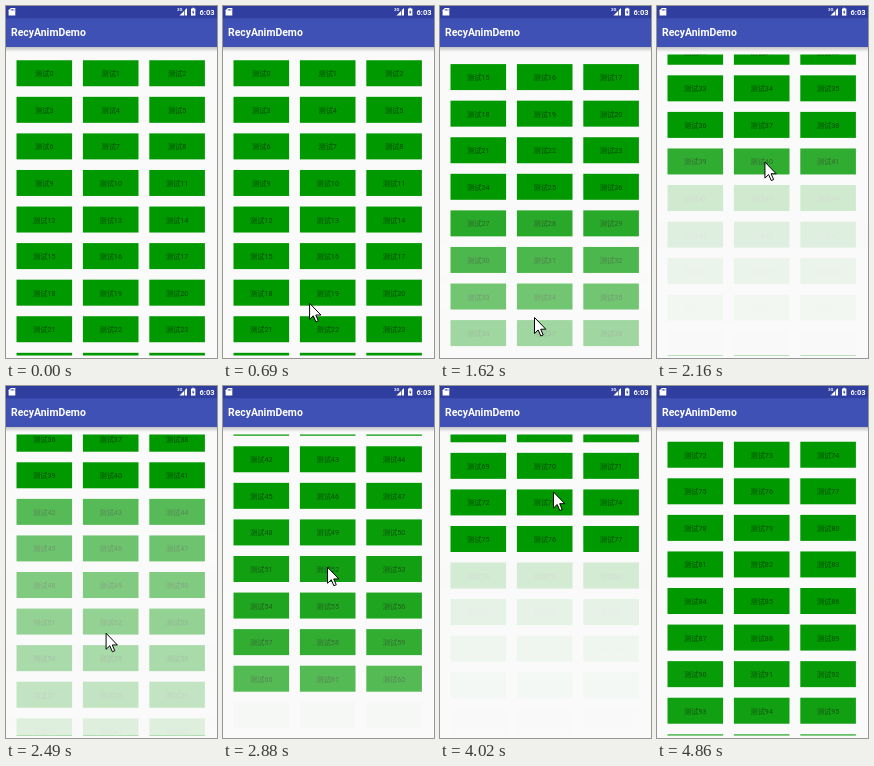
Write an HTML page with a canvas that moves like this. It is 211 px wide and 352 px high and loops after 5.37 s.

```html
<!DOCTYPE html>
<html lang="zh-CN">
<head>
<meta charset="utf-8">
<title>RecyAnimDemo</title>
<style>
  html, body { margin: 0; width: 100%; height: 100%; overflow: hidden; background: #fafafa; }
  canvas { display: block; width: 211px; height: 352px; }
</style>
</head>
<body>
<canvas id="stage"></canvas>
<script>
const W = 211, H = 352, LOOP = 5370, STEP = 30, END = 4860;
const ROWS = 33, TOP = 54.25, PITCH = 36.57, ROW_H = 26, MARGIN = 5, FADE = 1000;
const COL_W = 55.6, COL_PITCH = 66.4, LIST_TOP = 48.5, LIST_BOTTOM = 349.5;
const BACKGROUND = '#fafafa', GREEN = '#009900', BAR = '#3f51b5', STATUS = '#303f9f';
const FONT = 'Roboto, "Noto Sans CJK SC", "Noto Sans CJK", sans-serif';

const flings = [
  { start: 720, pace: 411, distance: 180.5 },
  { start: 1780, pace: 322, distance: 275 },
  { start: 2750, pace: 234, distance: 190 },
  { start: 3740, pace: 223, distance: 230.7 }
];

// Turning points of the pointer: [ms, x, y]
const turns = [
  [180, 197, 104], [700, 86, 297], [1180, 108, 132], [1620, 94, 311], [2240, 108, 149],
  [2660, 95, 300], [3000, 107.5, 135], [3560, 97, 300], [4020, 113, 105.5], [4800, 213, 232]
];

const canvas = document.getElementById('stage');
const ctx = canvas.getContext('2d');
const ratio = window.devicePixelRatio || 1;
canvas.width = Math.round(W * ratio);
canvas.height = Math.round(H * ratio);

const ease = x => (1 - Math.cos(Math.PI * Math.max(0, Math.min(1, x)))) / 2;

// Each fling speeds up quickly and then dies away.
function scrollAt(t) {
  return flings.reduce((sum, { start, pace, distance }) => {
    const x = Math.max(0, t - start) / pace;
    return sum + distance * (1 - Math.exp(-x * x));
  }, 0);
}

// A row starts fading in when its margin enters the screen.
function fadeStart(row) {
  const offset = TOP + row * PITCH - MARGIN - H;
  if (offset <= 0) return -FADE;
  let t = 0;
  while (t < END && scrollAt(t) < offset) t += 5;
  return t;
}
const starts = Array.from({ length: ROWS }, (_, row) => fadeStart(row));

function rect(color, x, y, w, h) {
  ctx.fillStyle = color;
  ctx.fillRect(x, y, w, h);
}

function shape(points, color) {
  ctx.beginPath();
  points.forEach(([x, y]) => ctx.lineTo(x, y));
  ctx.closePath();
  ctx.fillStyle = color;
  ctx.fill();
}

function text(label, x, y, font, color, align = 'left') {
  ctx.font = `${font} ${FONT}`;
  ctx.textAlign = align;
  ctx.fillStyle = color;
  ctx.fillText(label, x, y);
}

function drawRow(row, y, alpha) {
  for (let col = 0; col < 3; col++) {
    const x = 10.5 + col * COL_PITCH;
    rect(GREEN, x, y, COL_W, ROW_H);
    text('测试' + (row * 3 + col), x + COL_W / 2, y + 16, '7.2px', 'rgba(0,0,0,.52)', 'center');
  }
  // A veil over the finished row fades its fill and label together.
  ctx.globalAlpha = 1 - alpha;
  rect(BACKGROUND, 0, y - 1, W, ROW_H + 2);
  ctx.globalAlpha = 1;
}

function drawList(t) {
  const scroll = scrollAt(t);
  ctx.save();
  ctx.beginPath();
  ctx.rect(0, LIST_TOP, W, LIST_BOTTOM - LIST_TOP);
  ctx.clip();
  for (let row = 0; row < ROWS; row++) {
    const y = TOP + row * PITCH - scroll;
    if (y + ROW_H > LIST_TOP && y < LIST_BOTTOM) drawRow(row, y, ease((t - starts[row]) / FADE));
  }
  ctx.restore();
}

function drawBars() {
  const shadow = ctx.createLinearGradient(0, 41, 0, 46);
  shadow.addColorStop(0, 'rgba(0,0,0,.23)');
  shadow.addColorStop(1, 'rgba(0,0,0,0)');
  rect(shadow, 0, 41, W, 5);
  rect(BAR, 0, 12, W, 29);
  rect(STATUS, 0, 0, W, 12.3);
  text('RecyAnimDemo', 5, 30, 'bold 10.45px', '#fff');

  // memory card
  shape([[4.8, 2], [9.3, 2], [9.3, 9.6], [2.6, 9.6], [2.6, 4.2]], '#fff');
  for (let x = 4.8; x < 8; x += 1.4) rect(STATUS, x, 3, 0.7, 1.7);

  // signal, battery and clock
  text('3G', 171, 5.4, 'bold 4.3px', '#fff');
  shape([[181, 2], [181, 9.5], [173.5, 9.5]], '#fff');
  rect(STATUS, 178, 2, 0.7, 8);
  rect('#fff', 186.2, 1.8, 2, 1);
  rect('#fff', 185, 2.6, 4.4, 7);
  shape([[187.5, 3.8], [185.9, 6.5], [187, 6.5], [186.8, 8.6], [188.5, 5.8], [187.4, 5.8]], STATUS);
  text('6:03', 208.5, 8.6, 'bold 7.5px', '#fff', 'right');
}

function drawPointer(t) {
  const next = turns.findIndex(turn => turn[0] > t);
  if (next < 1) return;
  const [t0, x0, y0] = turns[next - 1], [t1, x1, y1] = turns[next];
  const k = ease((t - t0) / (t1 - t0));
  ctx.save();
  ctx.translate(x0 + (x1 - x0) * k, y0 + (y1 - y0) * k);
  shape([[0.5, 0.5], [0.5, 16.5], [4.2, 13], [6.8, 19], [9.2, 18], [6.7, 12.2], [11.8, 12.2]], '#fff');
  ctx.strokeStyle = '#000';
  ctx.lineWidth = 1;
  ctx.stroke();
  ctx.restore();
}

function draw(t) {
  ctx.setTransform(canvas.width / W, 0, 0, canvas.height / H, 0, 0);
  rect(BACKGROUND, 0, 0, W, H);
  drawList(t);
  drawBars();
  drawPointer(t);
}

const begin = performance.now();
function tick() {
  const t = (performance.now() - begin) % LOOP;
  draw(Math.min(END, Math.floor(t / STEP) * STEP));
  requestAnimationFrame(tick);
}
tick();
</script>
</body>
</html>
```
